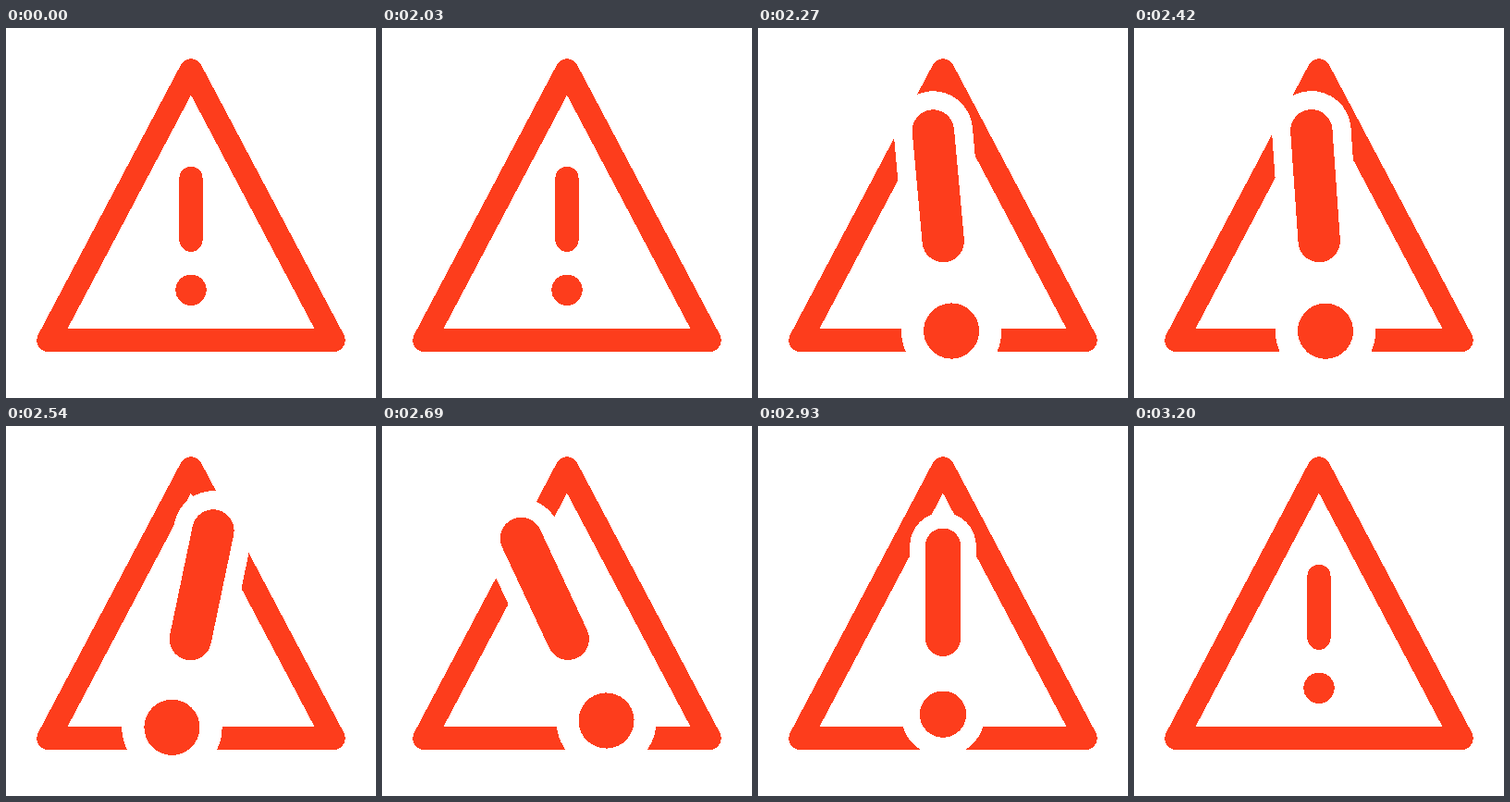
An HTML page that plays this animation: 400x400 px, repeating every 3230 ms.

```html
<!DOCTYPE html>
<html lang="en">
<head>
<meta charset="utf-8">
<title>Warning</title>
<style>
  html, body { margin: 0; width: 100%; height: 100%; overflow: hidden; background: #fff; }
  svg { display: block; width: 100%; height: 100%; }
</style>
</head>
<body>
<svg viewBox="0 0 400 400" shape-rendering="crispEdges" fill="none" stroke-linecap="round" stroke-linejoin="round">
  <path d="M200 45.8L354.2 337.5H45.8Z" stroke="#fd3d1c" stroke-width="25"/>
  <g id="mark">
    <path d="M200 162.5V229.2" stroke="#fff" stroke-width="47.5"/>
    <circle cx="200" cy="283.3" r="30.1" fill="#fff"/>
    <path d="M200 162.5V229.2" stroke="#fd3d1c" stroke-width="25.2"/>
    <circle cx="200" cy="283.3" r="16.7" fill="#fd3d1c"/>
  </g>
</svg>
<script>
  const LOOP = 3230, START = 2030, STEP = 30;
  const PIVOT = [200, 227.5];
  // [time in ms, value]
  const scaleKeys = [[2030, 1], [2250, 1.8], [2840, 1.8], [3060, 1]];
  const angleKeys = [[2236, 0], [2364, -30], [2487, 30], [2632, -30], [2857, 0]];
  const mark = document.getElementById('mark');

  const ease = p => p * p * (3 - 2 * p);

  function valueAt(keys, t) {
    if (t <= keys[0][0]) return keys[0][1];
    for (let i = 1; i < keys.length; i++) {
      const [t0, a] = keys[i - 1], [t1, b] = keys[i];
      if (t < t1) return a + (b - a) * ease((t - t0) / (t1 - t0));
    }
    return keys[keys.length - 1][1];
  }

  function draw() {
    const now = performance.now() % LOOP;
    const t = START + Math.floor((now - START) / STEP) * STEP;
    const [x, y] = PIVOT;
    mark.setAttribute('transform',
      `translate(${x} ${y}) rotate(${valueAt(angleKeys, t)}) scale(${valueAt(scaleKeys, t)}) translate(${-x} ${-y})`);
    requestAnimationFrame(draw);
  }
  draw();
</script>
</body>
</html>
```
